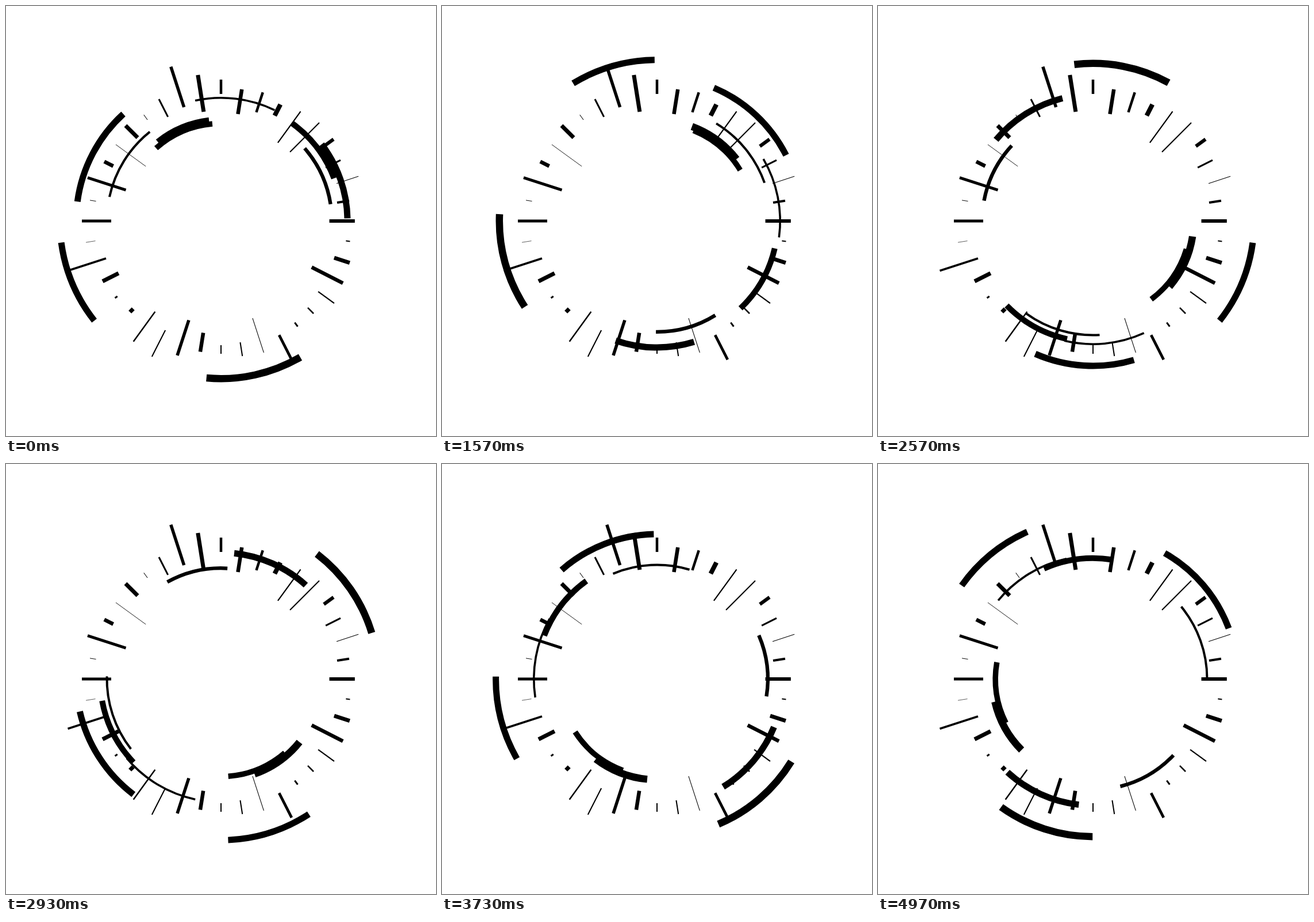
An HTML page that plays this animation: 748x748 px, repeating every 5.01 s.

```html
<!DOCTYPE html>
<html lang="en">
<head>
<meta charset="utf-8">
<title>Rotating arcs</title>
<style>
  html, body { margin: 0; width: 100%; height: 100%; overflow: hidden; background: #fff; }
  svg { display: block; width: 100vw; height: 100vh; fill: none; stroke: #000; }
</style>
</head>
<body>
<svg viewBox="-374 -374 748 748"><g id="ticks"></g><g id="arcs"></g></svg>
<script>
  const LOOP = 5010, STEPS = 150, RATE = 30 / 1000;

  // inner radius, outer radius, width; clockwise from the top
  const ticks = [
    [221, 246, 4.5], [188.4, 231.8, 6.5], [198.9, 235.3, 4.5], [205.7, 227.6, 8],
    [168.2, 235.6, 2.2], [169.7, 241.8, 2], [221.2, 242, 6], [204.4, 233.4, 3],
    [211.4, 251.4, 1], [204.5, 225.7, 4], [188.5, 232.8, 6], [220, 227.2, 2],
    [207, 235.4, 7], [177, 238, 6.5], [209, 243.4, 2.2], [213.5, 227.7, 2.5],
    [218.3, 227, 3], [222.7, 270.6, 4.7], [177.7, 240.8, 1], [213.6, 237.9, 2],
    [216, 231, 2], [197, 230.3, 6.5], [181.4, 246, 5.5], [213.3, 264.8, 2],
    [195, 259.2, 2.5], [216, 224, 7], [222.8, 228, 3], [200, 231.2, 7],
    [210.3, 280.2, 3.7], [221.2, 237.9, 0.6], [191, 242, 5], [220.2, 230.8, 0.9],
    [174, 244, 5], [210.4, 227.9, 6.5], [161.8, 226.2, 0.8], [205, 234.8, 7],
    [217.6, 228.4, 1], [203.3, 237.9, 3], [208.2, 282.2, 5.5], [192.4, 257.1, 7]
  ];

  // radius, width, start angle, span, total turn (degrees)
  const arcs = [
    [252, 11, 187.7, 39.9, 472],
    [280.4, 11, 141.8, 30.5, 433.7],
    [274.2, 12.5, 59.8, 35.5, 390.4],
    [210.2, 10, -53.9, 33.2, 300],
    [220, 11, -37.3, 36.1, 493.8],
    [192.8, 6.3, -41, 32.3, 444.5],
    [214.2, 3.6, -102.1, 37.9, 321.8],
    [175.2, 12.5, 231.4, 31.8, 263.8],
    [169.7, 9.5, 228.3, 36.6, 285],
    [198.5, 4, 192.2, 39.2, 488.5]
  ];

  function addPath(parent, d, width, angle) {
    const path = document.createElementNS("http://www.w3.org/2000/svg", "path");
    path.setAttribute("d", d);
    path.setAttribute("stroke-width", width);
    document.getElementById(parent).append(path);
    turn(path, angle);
    return path;
  }

  function turn(path, angle) {
    path.setAttribute("transform", `rotate(${angle})`);
  }

  ticks.forEach(([inner, outer, width], i) =>
    addPath("ticks", `M0 ${-inner}V${-outer}`, width, i * 360 / ticks.length));

  const paths = arcs.map(([r, width, start, span]) => {
    const a = span * Math.PI / 180;
    return addPath("arcs", `M${r} 0A${r} ${r} 0 0 1 ${r * Math.cos(a)} ${r * Math.sin(a)}`, width, start);
  });

  // The eased turn advances in discrete steps, then jumps back to the start.
  function draw(time) {
    const step = Math.min(STEPS - 1, Math.floor((time % LOOP + 3.4) * RATE));
    const ease = (1 - Math.cos(Math.PI * step / STEPS)) / 2;
    arcs.forEach(([, , start, , total], i) => turn(paths[i], start + total * ease));
  }

  const begin = performance.now();
  function tick() {
    draw(performance.now() - begin);
    requestAnimationFrame(tick);
  }
  tick();
</script>
</body>
</html>
```
